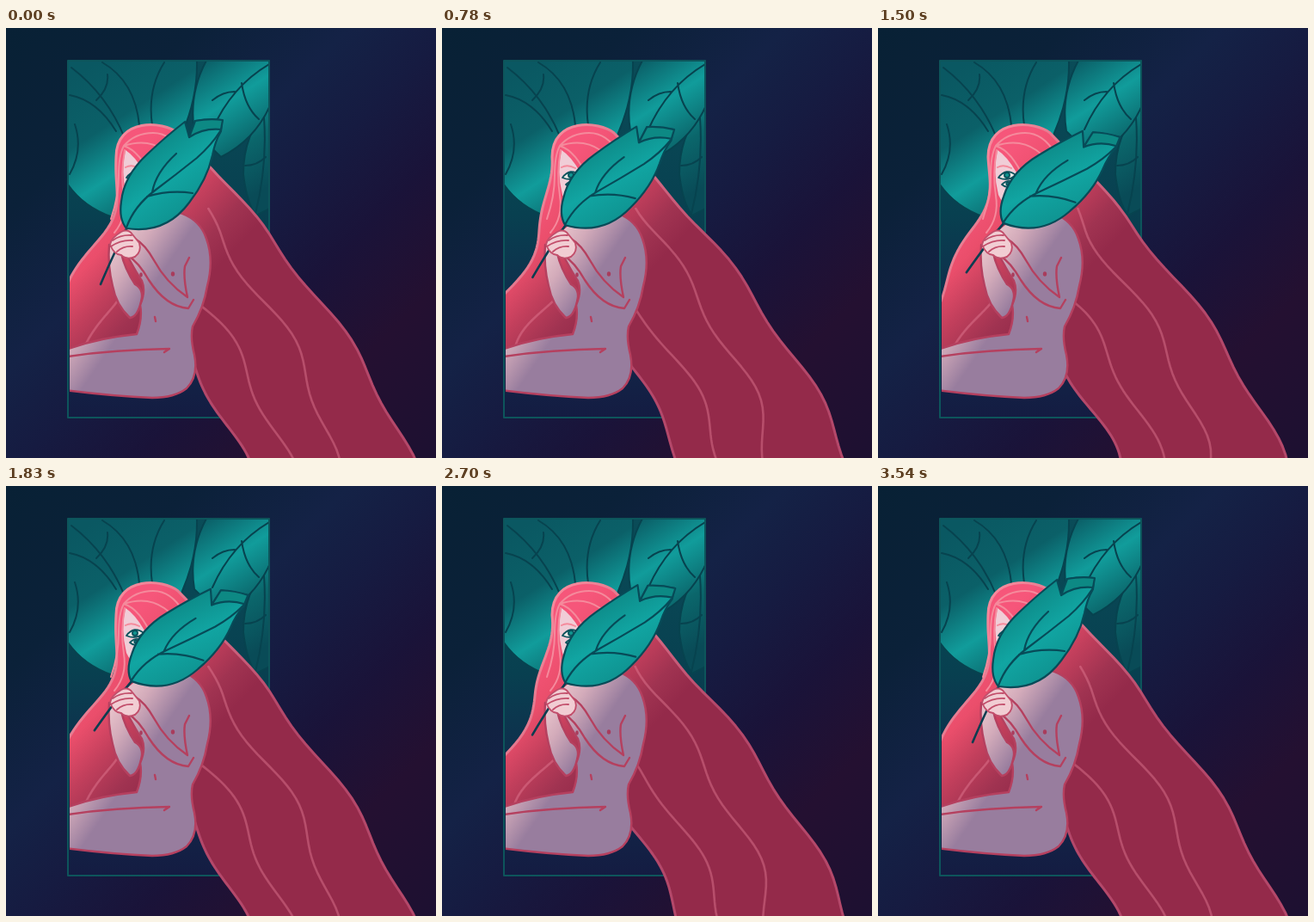
Write an HTML page that moves like this. It is 500 by 500 pixels and loops after 3570 ms.

```html
<!DOCTYPE html>
<html lang="en">
<head>
<meta charset="utf-8">
<title>Behind the leaf</title>
<style>
  html, body { margin: 0; width: 100%; height: 100%; overflow: hidden; background: #151a40; }
  svg { display: block; width: 100vw; height: 100vh; }
  path { stroke-linecap: round; stroke-linejoin: round; }
  .line { fill: none; }
  .vein { stroke: #07434f; stroke-width: 2; }
  .strand { stroke: #e8819a; stroke-opacity: .42; stroke-width: 2.6; }
  .skin { stroke: #b5405f; stroke-width: 2.4; }
  .hand { stroke: #c24e6b; stroke-width: 1.9; }
</style>
</head>
<body>
<svg viewBox="0 0 500 500">
  <defs>
    <linearGradient id="night" gradientUnits="userSpaceOnUse" x2="500" y2="500">
      <stop stop-color="#082135"/>
      <stop offset=".22" stop-color="#0b2139"/>
      <stop offset=".4" stop-color="#142246"/>
      <stop offset=".52" stop-color="#161b41"/>
      <stop offset=".65" stop-color="#1a1339"/>
      <stop offset=".8" stop-color="#241031"/>
      <stop offset="1" stop-color="#1d1031"/>
    </linearGradient>
    <linearGradient id="room" x2="0" y2="1">
      <stop stop-color="#0a4c58"/>
      <stop offset=".43" stop-color="#084050"/>
      <stop offset=".7" stop-color="#102c4c"/>
      <stop offset="1" stop-color="#141c42"/>
    </linearGradient>
    <linearGradient id="sheen" gradientUnits="userSpaceOnUse" x1="120" y1="30" x2="244" y2="223">
      <stop stop-color="#0a5862"/>
      <stop offset=".3" stop-color="#0b6068"/>
      <stop offset=".53" stop-color="#119c9b"/>
      <stop offset=".76" stop-color="#0b666b"/>
      <stop offset="1" stop-color="#094b57"/>
    </linearGradient>
    <linearGradient id="red" gradientUnits="userSpaceOnUse" x1="110" y1="190" x2="225" y2="300">
      <stop stop-color="#f6567a"/>
      <stop offset=".3" stop-color="#ea4e6b"/>
      <stop offset=".55" stop-color="#c23f5c"/>
      <stop offset=".8" stop-color="#a03351"/>
      <stop offset="1" stop-color="#942a4a"/>
    </linearGradient>
    <linearGradient id="edge" gradientUnits="userSpaceOnUse" x1="120" y1="150" x2="300" y2="280">
      <stop stop-color="#f58a9c"/>
      <stop offset="1" stop-color="#b4486a"/>
    </linearGradient>
    <linearGradient id="flesh" gradientUnits="userSpaceOnUse" x1="135" y1="215" x2="215" y2="270">
      <stop stop-color="#f3d0d4"/>
      <stop offset=".4" stop-color="#d3abba"/>
      <stop offset=".8" stop-color="#987d9e"/>
    </linearGradient>
    <linearGradient id="green" gradientUnits="userSpaceOnUse" x1="150" y1="135" x2="215" y2="225">
      <stop stop-color="#0c8482"/>
      <stop offset=".5" stop-color="#11a5a2"/>
      <stop offset="1" stop-color="#0e8e8c"/>
    </linearGradient>
    <clipPath id="pane"><path d="M73 39H306V452H73Z"/></clipPath>
    <clipPath id="open"><path d="M74 0H500V500H74Z"/></clipPath>
  </defs>

  <path fill="url(#night)" d="M0 0H500V500H0Z"/>

  <g clip-path="url(#pane)">
    <path fill="url(#room)" d="M72 38H306V453H72Z"/>
    <g class="vein" fill="url(#sheen)">
      <path d="M72 38H222Q223 80 205 122L180 200L124 220Q90 208 72 182Z"/>
      <path d="M306 92Q276 122 276 170Q280 204 291 218L310 208Z"/>
      <path d="M234 36Q212 76 219 120L250 150Q290 130 308 88V36Z"/>
    </g>
    <path class="line vein" d="M76 46Q118 78 138 128M112 40Q150 62 155 113M184 40Q164 72 170 113M74 78Q106 84 128 120
      M118 54Q120 70 105 84M74 170Q90 142 80 112M306 42Q262 68 240 118M274 64Q278 92 294 106M240 84Q252 74 266 74
      M300 104Q304 160 290 216M278 160Q292 160 302 150"/>
  </g>
  <path class="line" stroke="#0d555b" stroke-width="2" d="M72 38H306V453H72Z"/>

  <g clip-path="url(#open)">
    <path id="hair" fill="url(#red)" stroke="url(#edge)" stroke-width="3"/>
    <g id="strands" class="line strand"></g>

    <path fill="#f0cdd7" d="M139 142Q150 149 161 168L172 218Q148 212 140 194Q133 166 139 142Z"/>
    <path class="line" stroke="#f58a9c" stroke-width="2" d="M137 137Q150 122 171 122T206 146M137 137Q164 128 184 142T214 176
      M137 137Q156 143 170 176M137 137Q131 148 131 172T122 222M138 142Q133 170 137 195T126 238M139 162Q146 158 155 163"/>
    <g stroke="#08525c" stroke-width="1.8" fill="#e9e8e5">
      <path d="M140 174Q149 162 160 171Q152 179 140 174Z"/>
      <path d="M144 182Q151 175 160 180Q152 189 144 182Z"/>
      <circle cx="150" cy="171" r="3" fill="#11958f"/>
      <circle cx="151" cy="181" r="1.7" fill="#11958f"/>
    </g>

    <g class="skin" fill="url(#flesh)">
      <path d="M150 226Q185 207 205 216Q226 224 233 245Q242 270 234 300Q230 325 217 347Q214 360 219 380Q224 405 210 419
        Q196 430 170 430Q120 428 60 420V378Q100 361 152 356Q159 338 156 322Q163 306 158 294Q146 276 130 242Z"/>
      <path d="M120 252Q118 276 124 300Q128 322 144 337Q153 336 157 318Q161 304 150 298Q138 280 134 262Z"/>
      <path stroke="none" d="M146 244Q160 250 171 268Q188 298 210 312L212 326Q192 326 168 296Q156 274 138 264Z"/>
      <path class="line" d="M150 245Q162 252 172 270Q186 296 211 313Q206 290 208 277L213 267M142 265Q154 272 166 293Q186 324 212 326L218 316
        M60 384Q118 374 190 373L184 377M173 336L174 341"/>
    </g>
    <g fill="#a93c5c">
      <ellipse cx="194" cy="286" rx="2.2" ry="2.8"/>
      <ellipse cx="157" cy="287" rx="1.8" ry="2.8"/>
    </g>
  </g>

  <g id="leaf" stroke="#074b58" stroke-width="2.2">
    <path class="line" stroke="#083d50" stroke-width="2.6" d="M141 232Q128 256 110 298"/>
    <path fill="url(#green)" d="M140 233Q131 222 134 202Q137 172 164 147Q186 126 208 109L213 127L220 108Q236 106 251 107L250 120
      Q243 132 240 148Q234 176 213 203C196 226 172 238 140 233Z"/>
    <path fill="#0d8984" d="M213 127L220 108Q236 105 252 107L250 118Q230 116 213 127Z"/>
    <path class="line" d="M140 232Q149 207 173 189T222 151Q239 136 249 120M164 196Q190 188 217 192M170 191Q174 168 198 146"/>
  </g>

  <g class="hand" fill="#f1cdd3">
    <path d="M121 252Q122 244 134 237Q142 233 147 240L155 250Q158 260 150 266Q140 270 134 264Q126 264 121 252Z"/>
    <path class="line" d="M124 247Q134 240 146 241M122 254Q134 246 147 247M129 260Q137 253 147 254"/>
  </g>
</svg>
<script>
  const LOOP = 3570, STEP = 30, TAU = 2 * Math.PI;
  const $ = id => document.getElementById(id);
  const clamp = u => Math.min(1, Math.max(0, u));

  // Each lock: start, two handles, end of its rest curve, and how far it sways.
  const left = { rest: [[128, 150], [130, 215], [112, 248], [55, 335]], amp: 9 };
  const under = { rest: [[200, 350], [216, 405], [262, 450], [279, 507]], amp: 6 };
  const right = { rest: [[476, 515], [435, 390], [300, 225], [200, 122]], amp: 5 };
  const strands = [
    { rest: [[230, 210], [278, 295], [372, 395], [381, 507]], amp: 8 },
    { rest: [[212, 310], [262, 352], [300, 430], [329, 507]], amp: 8 },
    { rest: [[138, 306], [128, 326], [100, 340], [88, 370]], amp: 4 }
  ];

  const lines = strands.map(() => {
    const p = document.createElementNS("http://www.w3.org/2000/svg", "path");
    $("strands").append(p);
    return p;
  });

  // A sideways wave runs down the hair, growing away from the head.
  function lock({ rest: [a, b, c, d], amp }, phase) {
    const points = [];
    for (let i = 0; i <= 40; i++) {
      const u = i / 40, v = 1 - u;
      const [x, y] = [0, 1].map(k => v * v * v * a[k] + 3 * v * v * u * b[k] + 3 * v * u * u * c[k] + u * u * u * d[k]);
      const wave = amp * clamp((y - 150) / 90) * Math.cos(TAU * (phase - .0066 * y + 1.37));
      points.push((x + wave).toFixed(2) + " " + y.toFixed(2));
    }
    return points.join("L");
  }

  function ease(t, from, to) {
    return (1 - Math.cos(Math.PI * clamp((t - from) / (to - from)))) / 2;
  }

  function draw(now) {
    const t = Math.floor(now % LOOP / STEP) * STEP;
    const phase = 2 * t / LOOP;
    $("hair").setAttribute("d",
      `M${lock(left, phase)}L50 395H190L${lock(under, phase)}L${lock(right, phase)}C183 108 128 104 128 150Z`);
    lines.forEach((line, i) => line.setAttribute("d", "M" + lock(strands[i], phase)));
    const turn = 12 * (ease(t, 150, 1270) - ease(t, 2200, 3420));
    $("leaf").setAttribute("transform", `rotate(${turn.toFixed(3)} 172 257)`);
  }

  let begin;
  function tick(now) {
    begin ??= now;
    draw(now - begin);
    requestAnimationFrame(tick);
  }
  draw(0);
  requestAnimationFrame(tick);
</script>
</body>
</html>
```
